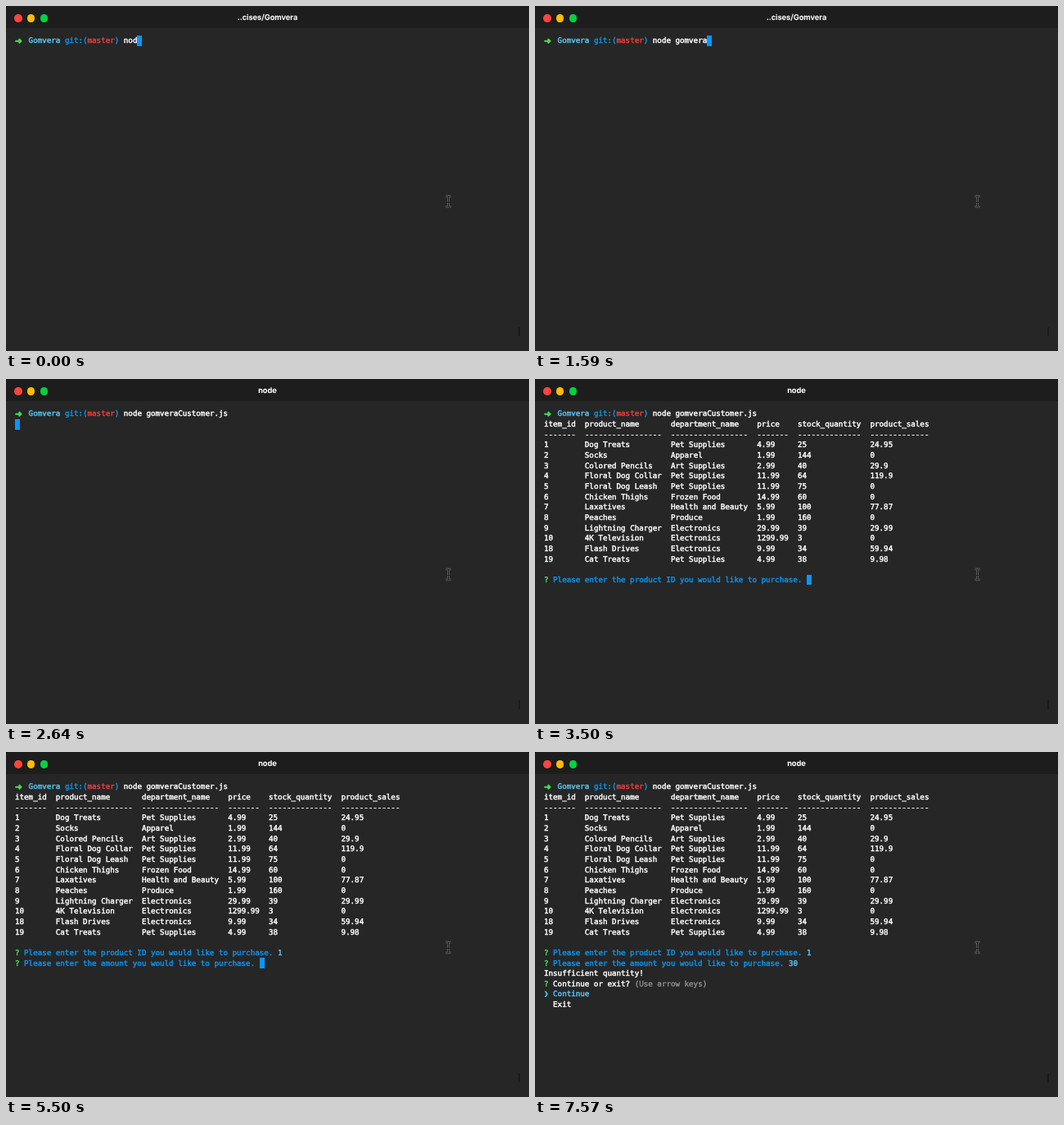
Write an HTML page that moves like this. It is 639 px wide and 421 px high and loops after 8 s.

```html
<!DOCTYPE html>
<html lang="en">
<head>
<meta charset="utf-8">
<title>Terminal</title>
<style>
  html, body { margin: 0; width: 100%; height: 100%; overflow: hidden; background: #000; }
  #win {
    position: absolute; left: 0; top: 0; width: 639px; height: 421px;
    background: #262626; border-radius: 4px 4px 0 0; overflow: hidden;
  }
  #bar { position: absolute; left: 0; top: 0; width: 100%; height: 27px; background: #1d1d1d; }
  #title {
    position: absolute; left: 0; top: 8px; width: 100%; text-align: center;
    font: 600 9.3px/14px Inter, Roboto, sans-serif; color: #fff;
    text-rendering: geometricPrecision; -webkit-text-stroke: 0.15px currentColor;
  }
  .dot { position: absolute; top: 10.3px; width: 9.4px; height: 9.4px; border-radius: 50%; }
  .run {
    position: absolute; margin-top: 1.1px; white-space: pre;
    font: 9.194px/12.65px "DejaVu Sans Mono", monospace;
    font-variant-ligatures: none; text-rendering: geometricPrecision;
    -webkit-text-stroke: 0.45px currentColor;
  }
  .arrow { font-family: "DejaVu Sans", sans-serif; font-size: 10.5px; -webkit-text-stroke-width: 0.8px; }
  #cursor { position: absolute; width: 6px; height: 12.65px; background: #0a95ff; }
  svg { position: absolute; left: 0; top: 0; }
</style>
</head>
<body>
<div id="win">
  <div id="bar"></div>
  <div class="dot" style="left:10.3px;background:#ff453f"></div>
  <div class="dot" style="left:26px;background:#ffbd05"></div>
  <div class="dot" style="left:41.8px;background:#04d244"></div>
  <div id="title"></div>
  <div id="cursor"></div>
  <svg width="639" height="421" fill="none">
    <defs>
      <path id="beam" d="M537.5 232h2q1 0 1 1.5v10q0 1.5 -1 1.5h-2M543.5 232h-2q-1 0 -1 1.5v10q0 1.5 1 1.5h2M539 239.5h3"/>
    </defs>
    <use href="#beam" stroke="#727272" stroke-width="2.4"/>
    <use href="#beam" stroke="#1a1a1a" stroke-width="1.1"/>
    <path d="M627 392v11" stroke="#1a1a1a" stroke-width="2"/>
  </svg>
</div>
<script>
const LOOP = 8000, LEFT = 11, TOP = 36.4, CELL = 5.535, LINE = 12.65;
const WHITE = '#fff', BLUE = '#0d92ec', CYAN = '#58c5f2', GREEN = '#45e05c', RED = '#ec3d3b', GRAY = '#8b8b8b';
const COMMAND = 'node gomveraCustomer.js ';

const win = document.getElementById('win');
const title = document.getElementById('title');
const cursor = document.getElementById('cursor');
const runs = [];

function place(el, row, col) {
  el.style.left = LEFT + col * CELL + 'px';
  el.style.top = TOP + row * LINE + 'px';
}

function run(start, row, col, text, color, extra = '') {
  const el = document.createElement('span');
  el.className = 'run ' + extra;
  el.textContent = text;
  el.style.color = color;
  place(el, row, col);
  win.insertBefore(el, cursor.nextSibling);
  runs.push({ el, start });
  return el;
}

// Shell prompt
run(0, 0, 0, '➜', GREEN, 'arrow');
run(0, 0, 3, 'Gomvera', CYAN);
run(0, 0, 11, 'git:(', BLUE);
run(0, 0, 16, 'master', RED);
run(0, 0, 22, ')', BLUE);
run(2640, 0, 24, COMMAND, WHITE);

// Product table
const COLS = [0, 9, 28, 47, 56, 72], WIDTHS = [7, 17, 17, 7, 14, 13];
const TABLE = `item_id|product_name|department_name|price|stock_quantity|product_sales
${WIDTHS.map(n => '-'.repeat(n)).join('|')}
1|Dog Treats|Pet Supplies|4.99|25|24.95
2|Socks|Apparel|1.99|144|0
3|Colored Pencils|Art Supplies|2.99|40|29.9
4|Floral Dog Collar|Pet Supplies|11.99|64|119.9
5|Floral Dog Leash|Pet Supplies|11.99|75|0
6|Chicken Thighs|Frozen Food|14.99|60|0
7|Laxatives|Health and Beauty|5.99|100|77.87
8|Peaches|Produce|1.99|160|0
9|Lightning Charger|Electronics|29.99|39|29.99
10|4K Television|Electronics|1299.99|3|0
18|Flash Drives|Electronics|9.99|34|59.94
19|Cat Treats|Pet Supplies|4.99|38|9.98`;
TABLE.split('\n').forEach((line, i) =>
  line.split('|').forEach((cell, j) => run(3500, i + 1, COLS[j], cell, WHITE)));

// Questions and answers
run(3500, 16, 0, '?', GREEN);
run(3500, 16, 2, 'Please enter the product ID you would like to purchase.', BLUE);
run(5500, 16, 58, '1', CYAN);
run(5500, 17, 0, '?', GREEN);
run(5500, 17, 2, 'Please enter the amount you would like to purchase.', BLUE);
run(7320, 17, 54, '30', CYAN);
run(7320, 18, 0, 'Insufficient quantity!', WHITE);
run(7320, 19, 0, '?', GREEN);
run(7320, 19, 2, 'Continue or exit?', WHITE);
run(7320, 19, 20, '(Use arrow keys)', GRAY);
run(7320, 20, 0, '❯', CYAN);
run(7320, 20, 2, 'Continue', CYAN);
run(7320, 21, 2, 'Exit', WHITE);

// Live input: time, row, column, text before the cursor
const shell = (time, count) => [time, 0, 24, COMMAND.slice(0, count)];
const INPUT = [
  shell(0, 3), shell(260, 5), shell(660, 6), shell(790, 7), shell(930, 9),
  shell(1190, 10), shell(1320, 11), shell(1590, 12), shell(1840, 13), shell(2110, 24),
  [2640, 1, 0, ''],
  [3500, 16, 58, ''], [4940, 16, 58, '1'],
  [5500, 17, 54, ''], [6290, 17, 54, '3'], [6550, 17, 54, '30'],
  [7320, 0, 0, null]
];
const typed = run(0, 0, 0, '', WHITE);

function draw(t) {
  for (const r of runs) r.el.style.visibility = t >= r.start ? 'visible' : 'hidden';
  title.textContent = t < 2640 ? '..cises/Gomvera' : 'node';
  const [, row, col, text] = INPUT.findLast(step => step[0] <= t);
  typed.textContent = text || '';
  place(typed, row, col);
  cursor.style.visibility = text === null ? 'hidden' : 'visible';
  place(cursor, row, col + (text || '').length);
}

const origin = performance.now();
function tick() {
  draw((performance.now() - origin) % LOOP);
  requestAnimationFrame(tick);
}
draw(0);
requestAnimationFrame(tick);
</script>
</body>
</html>
```
